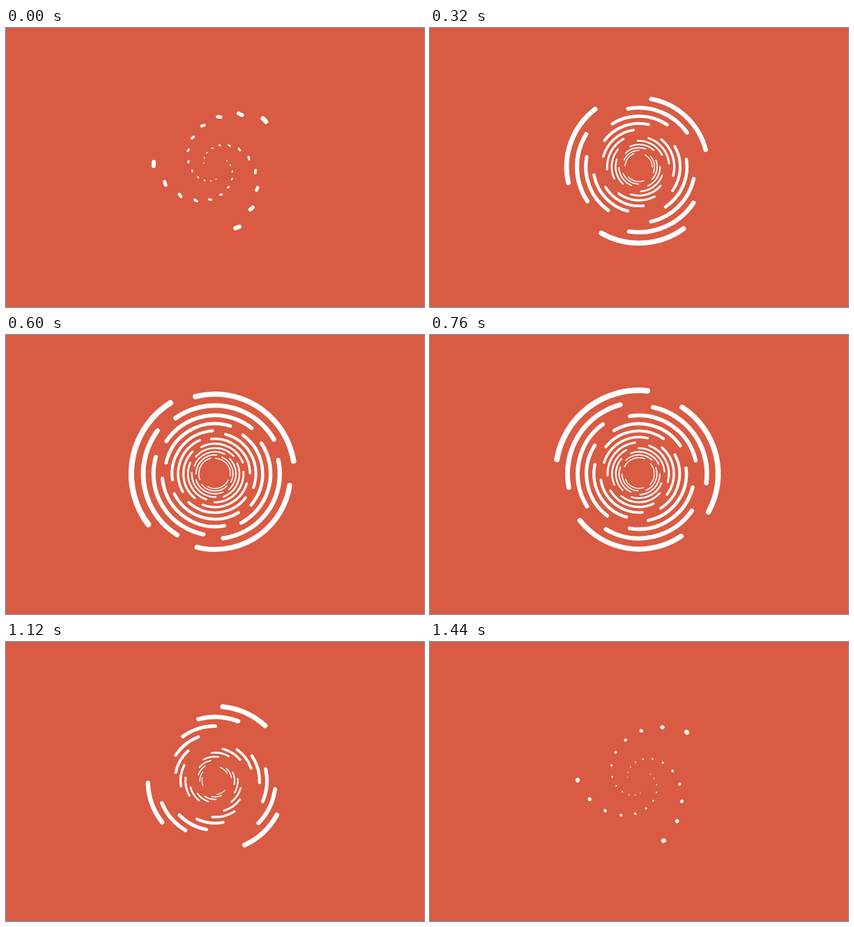
An HTML page with a canvas that plays this animation: 600x400 px, repeating every 1.48 s.

```html
<!DOCTYPE html>
<html>
<head>
<meta charset="utf-8">
<style>
  html, body { margin: 0; height: 100%; overflow: hidden; background: #d95b43; }
  canvas { display: block; }
</style>
</head>
<body>
<canvas id="stage" width="600" height="400"></canvas>
<script>
const ctx = document.getElementById('stage').getContext('2d');
const LOOP = 1480, STEP = 40, ARCS = 35, SHRINK = 0.95, TWIST = 113;

// time, angle of the outer arc, its sweep (degrees), its radius
const keys = [
  [0, -43.3, 3.7, 97.6],
  [80, -22, 15, 98.9],
  [160, 13, 32.5, 102],
  [320, 87, 65.3, 109.4],
  [600, 190.3, 95, 120.2],
  [760, 232.9, 85.8, 119.7],
  [960, 272, 60.8, 113.6],
  [1120, 294.1, 36.3, 106.8],
  [1280, 307.6, 11.5, 100.4],
  [1440, 314.6, 0.5, 97.7]
];

// Keys repeat each loop, one full turn further on.
function key(i) {
  const n = keys.length, turns = Math.floor(i / n);
  const [t, angle, sweep, radius] = keys[i - turns * n];
  return [t + turns * LOOP, angle + turns * 360, sweep, radius];
}

function slope(i, c) {
  const [a, b, d] = [key(i - 1), key(i), key(i + 1)];
  const h0 = b[0] - a[0], h1 = d[0] - b[0];
  return ((b[c] - a[c]) / h0 * h1 + (d[c] - b[c]) / h1 * h0) / (h0 + h1);
}

// Smooth cubic curve through the keys
function valueAt(t, c) {
  let i = 0;
  while (key(i + 1)[0] <= t) i++;
  const a = key(i), b = key(i + 1), h = b[0] - a[0], u = (t - a[0]) / h, v = 1 - u;
  return a[c] * v * v * (1 + 2 * u) + b[c] * u * u * (3 - 2 * u)
    + h * u * v * (slope(i, c) * v - slope(i + 1, c) * u);
}

function draw(t) {
  const rad = Math.PI / 180;
  const angle = valueAt(t, 1) * rad;
  const half = Math.max(0.1, valueAt(t, 2) / 2) * rad;
  let radius = valueAt(t, 3);

  ctx.fillStyle = '#d95b43';
  ctx.fillRect(0, 0, 600, 400);
  ctx.strokeStyle = '#fff';
  ctx.lineCap = 'round';
  for (let i = 0; i < ARCS; i++, radius *= SHRINK) {
    const mid = angle + i * TWIST * rad;
    ctx.lineWidth = radius / 15;
    ctx.beginPath();
    ctx.arc(300, 199, radius, mid - half, mid + half);
    ctx.stroke();
  }
}

function tick() {
  const t = performance.now() % LOOP;
  draw(Math.floor(t / STEP) * STEP);
  requestAnimationFrame(tick);
}
tick();
</script>
</body>
</html>
```
